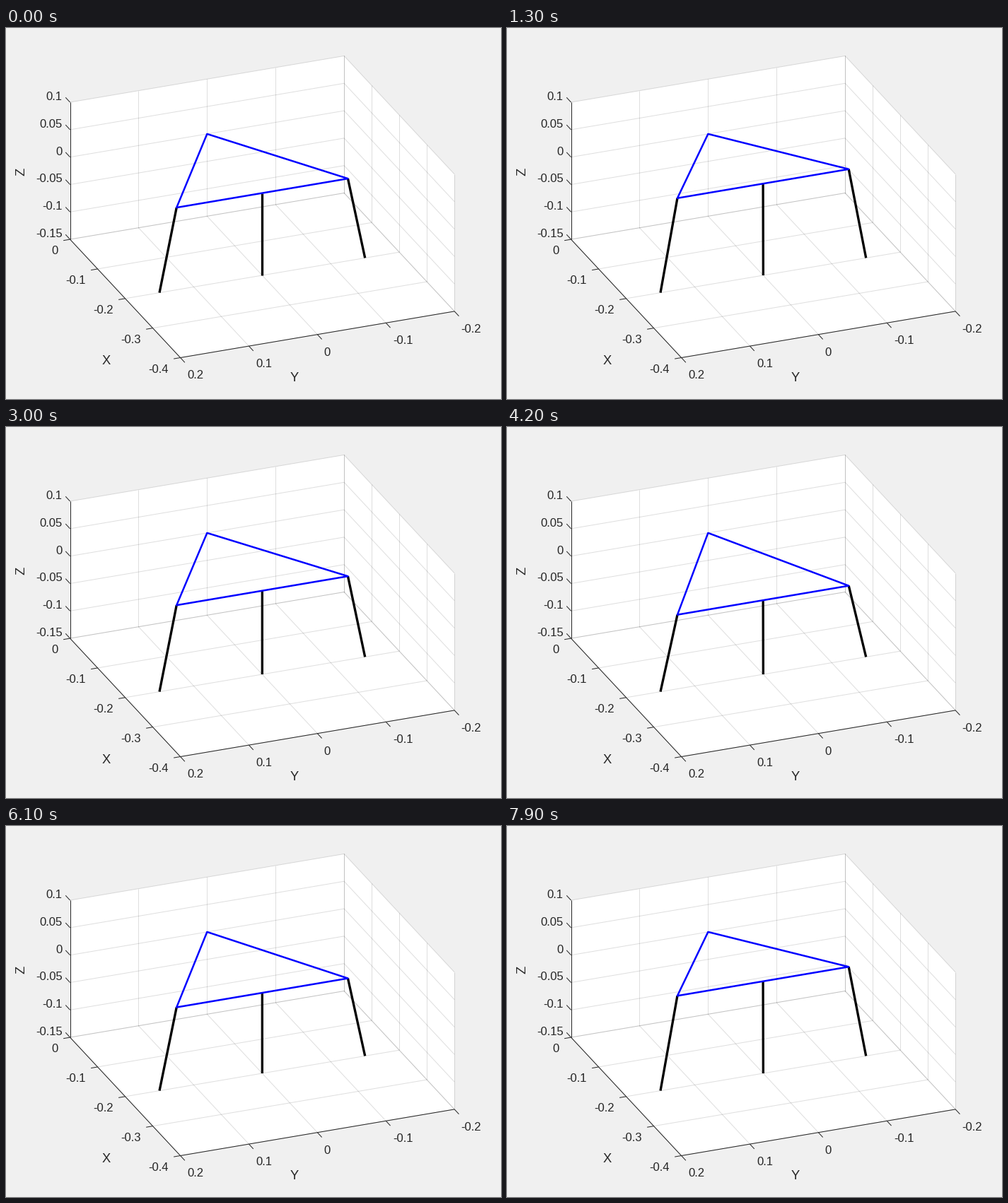
A matplotlib script that plays this animation: 700x525 px, repeating every 8000 ms.

```python
import numpy as np
import matplotlib.pyplot as plt
from matplotlib.animation import FuncAnimation

W, H, DPI = 700, 525, 100
FRAMES, STEP_MS = 80, 100
PX = 72 / DPI                      # points per pixel
INK = "#262626"

plt.rcParams["font.family"] = "Liberation Sans"

X_TICKS = [0, -0.1, -0.2, -0.3, -0.4]
Y_TICKS = [0.2, 0.1, 0, -0.1, -0.2]
Z_TICKS = [-0.15, -0.1, -0.05, 0, 0.05, 0.1]
X0, X1 = X_TICKS[0], X_TICKS[-1]
Y0, Y1 = Y_TICKS[0], Y_TICKS[-1]
Z0, Z1 = Z_TICKS[0], Z_TICKS[-1]

ARM, HALF_TOP, HALF_BASE = 0.2, 0.125, 0.15
TILT = np.radians(5)


def project(x, y, z):
    """Orthographic projection to stage pixels."""
    return (284.35 - 390 * x - 969 * y,
            149.9 - 418.5 * x + 164 * y - 776 * z)


def xy(points):
    return np.array([project(*p) for p in points])


fig = plt.figure(figsize=(W / DPI, H / DPI), dpi=DPI, facecolor="#f0f0f0")
ax = fig.add_axes([0, 0, 1, 1])
ax.set_xlim(0, W)
ax.set_ylim(H, 0)
ax.axis("off")


def line(a, b, **style):
    p = xy([a, b])
    ax.plot(p[:, 0], p[:, 1], lw=PX, solid_capstyle="butt", **style)


def grid(a, b):
    line(a, b, color=INK, alpha=0.15, zorder=1)


def axis_line(a, b):
    line(a, b, color=INK, zorder=2)


def tick(point, direction, value, offset, ha):
    x, y = project(*point)
    dx, dy = direction
    ax.plot([x, x + dx], [y, y + dy], color=INK, lw=PX, zorder=2,
            solid_capstyle="butt")
    ax.text(x + offset[0], y + offset[1], f"{value:g}", color=INK,
            fontsize=16.67 * PX, ha=ha, va="baseline")


def axis_label(x, y, text, rotation=0):
    ax.text(x, y, text, color=INK, fontsize=18.33 * PX, ha="center",
            va="baseline", rotation=rotation, rotation_mode="anchor")


# Walls and floor
outline = xy([(X0, Y0, Z0), (X0, Y0, Z1), (X0, Y1, Z1),
              (X1, Y1, Z1), (X1, Y1, Z0), (X1, Y0, Z0)])
ax.fill(outline[:, 0], outline[:, 1], color="white", lw=0, zorder=0)

for x in X_TICKS:
    grid((x, Y0, Z0), (x, Y1, Z0))
    grid((x, Y1, Z0), (x, Y1, Z1))
    tick((x, Y0, Z0), (-9.4, 1.6), x, (-17, 21), "right")
for y in Y_TICKS:
    grid((X0, y, Z0), (X1, y, Z0))
    grid((X0, y, Z0), (X0, y, Z1))
    tick((X1, y, Z0), (6.3, 6.8), y, (9.5, 30), "left")
for z in Z_TICKS:
    grid((X0, Y0, z), (X0, Y1, z))
    grid((X0, Y1, z), (X1, Y1, z))
    tick((X0, Y0, z), (-6.3, -6.8), z, (-11, -3), "right")

axis_line((X0, Y0, Z0), (X1, Y0, Z0))
axis_line((X1, Y0, Z0), (X1, Y1, Z0))
axis_line((X0, Y0, Z0), (X0, Y0, Z1))
axis_label(141.5, 475.5, "X")
axis_label(408, 500.5, "Y")
axis_label(26, 203, "Z", rotation=90)

# Tilting platform on three legs
feet = xy([(-ARM, y, Z0) for y in (HALF_BASE, 0, -HALF_BASE)])
legs = [ax.plot([], [], color="black", lw=3.33 * PX, zorder=3,
                solid_capstyle="butt")[0] for _ in feet]
plate = plt.Polygon(np.zeros((3, 2)), closed=True, fill=False,
                    edgecolor="blue", lw=2.5 * PX, joinstyle="round", zorder=4)
ax.add_patch(plate)


def update(i):
    angle = TILT * np.sin(i * STEP_MS / 1000)
    x, z = -ARM * np.cos(angle), ARM * np.sin(angle)
    tops = xy([(x, y, z) for y in (HALF_TOP, 0, -HALF_TOP)])
    for leg, top, foot in zip(legs, tops, feet):
        leg.set_data([top[0], foot[0]], [top[1], foot[1]])
    plate.set_xy([project(0, 0, 0), tops[0], tops[2]])
    return [*legs, plate]


anim = FuncAnimation(fig, update, frames=FRAMES, interval=STEP_MS,
                     repeat=True, repeat_delay=0)
plt.show()
```
